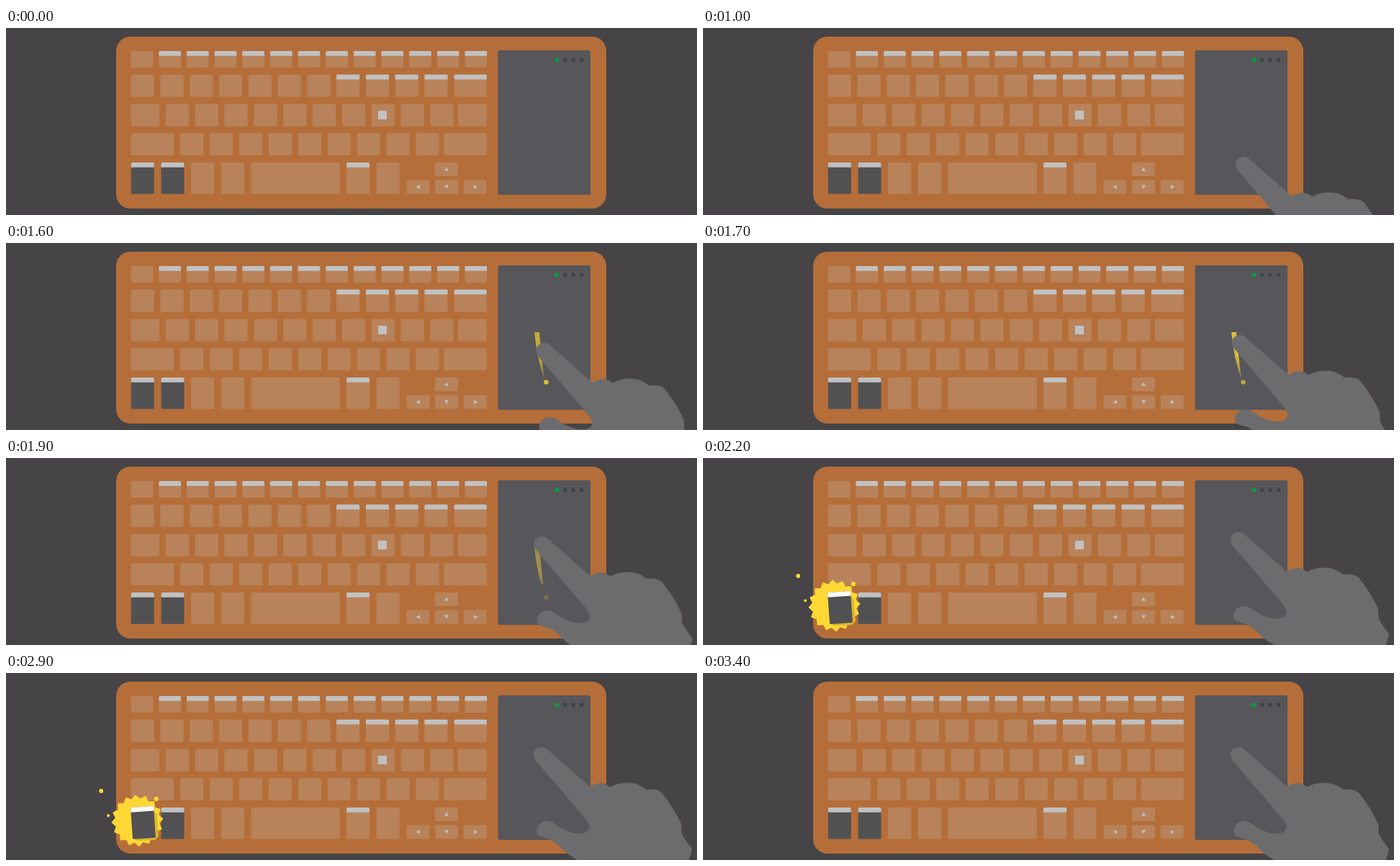
Write an HTML page that moves like this. It is 960 by 260 pixels and loops after 3.6 s.

```html
<!DOCTYPE html>
<html lang="en">
<head>
<meta charset="utf-8">
<title>Keyboard with touchpad</title>
<style>
  html, body { margin: 0; width: 100%; height: 100%; overflow: hidden; background: #464446; }
  svg { display: block; width: 960px; height: 260px; }
  .key { fill: #b8835b; }
  .dark { fill: #515153; }
  .cap { fill: #c1c1c2; }
  .yellow { fill: #fdd835; }
  .shade { fill: #dcb92e; }
  .anim { animation: 3600ms step-end infinite; }

  #hand { fill: #6c6c6e; animation-name: swipe; }
  @keyframes swipe {
    0% { visibility: hidden; transform: translate(7px, 76px); }
    27.777% { visibility: visible; transform: translate(7px, 76px); }
    41.666% { visibility: visible; transform: translate(5.5px, 48px); }
    44.444% { visibility: visible; transform: translate(3.7px, 36px); }
    47.222% { visibility: visible; transform: translate(2px, 25px); }
    50% { visibility: visible; transform: translate(1.2px, 14px); }
    52.777% { visibility: visible; transform: translate(.5px, 6px); }
    55.555%, 100% { visibility: visible; transform: none; }
  }

  #spot { animation-name: spot; }
  @keyframes spot {
    0% { opacity: 0; }
    41.666% { opacity: 1; }
    44.444% { opacity: .8; }
    47.222% { opacity: .6; }
    50% { opacity: .4; }
    52.777% { opacity: .2; }
    55.555%, 100% { opacity: 0; }
  }

  #trail { animation-name: trail; }
  @keyframes trail {
    0% { opacity: 0; clip-path: inset(0 0 5% 0); }
    41.666% { opacity: .5; clip-path: inset(0 0 5% 0); }
    44.444% { opacity: .65; clip-path: inset(0 0 0 0); }
    47.222% { opacity: .8; clip-path: inset(0 0 0 0); }
    50% { opacity: .65; clip-path: inset(0 0 12% 0); }
    52.777% { opacity: .45; clip-path: inset(0 0 24% 0); }
    55.555% { opacity: .25; clip-path: inset(0 0 36% 0); }
    58.333%, 100% { opacity: 0; clip-path: inset(0 0 36% 0); }
  }

  #rest { animation-name: rest; }
  @keyframes rest {
    0% { visibility: visible; }
    58.333% { visibility: hidden; }
    94.444%, 100% { visibility: visible; }
  }
  #start { animation-name: start; }
  @keyframes start {
    0% { visibility: hidden; }
    58.333% { visibility: visible; }
    61.111%, 100% { visibility: hidden; }
  }
  #left { animation-name: left; }
  @keyframes left {
    0% { visibility: hidden; }
    61.111% { visibility: visible; }
    75% { visibility: hidden; }
    80.555% { visibility: visible; }
    94.444%, 100% { visibility: hidden; }
  }
  #right { animation-name: right; }
  @keyframes right {
    0% { visibility: hidden; }
    75% { visibility: visible; }
    80.555%, 100% { visibility: hidden; }
  }
</style>
</head>
<body>
<svg viewBox="0 0 960 260">
  <defs>
    <linearGradient id="glow" x1="0" y1="0" x2="0" y2="1">
      <stop offset="0" stop-color="#fdd835"/>
      <stop offset=".5" stop-color="#fdd835"/>
      <stop offset="1" stop-color="#fdd835" stop-opacity=".35"/>
    </linearGradient>
  </defs>

  <rect x="153" y="12" width="681" height="239" rx="20" fill="#b56e39"/>
  <g id="keys"></g>
  <g id="rest" class="anim"></g>
  <rect x="517" y="115" width="12" height="12" class="cap"/>
  <path class="cap" d="M612 193.5l3 5h-6zM609 218.5h6l-3 5zM569.5 221l5.5-2.8v5.6zM655.5 221l-5.5-2.8v5.6z"/>

  <rect x="683.5" y="31" width="128.5" height="201" rx="2.5" fill="#57565a"/>
  <circle cx="765.3" cy="44.4" r="3" fill="#089c44"/>
  <g fill="#434246">
    <circle cx="776.7" cy="44.4" r="2.9"/>
    <circle cx="788.1" cy="44.4" r="2.9"/>
    <circle cx="799.6" cy="44.4" r="2.9"/>
  </g>

  <path id="trail" class="anim" fill="url(#glow)" d="M734 124Q738 162 748 190Q744 158 741 124Z"/>
  <circle id="spot" class="anim yellow" cx="750.5" cy="193.5" r="3.3"/>

  <g id="start" class="anim"></g>
  <g id="left" class="anim"></g>
  <g id="right" class="anim"></g>

  <path id="hand" class="anim" d="M736 122C731 116 732 107 739 104C744 102 749 103 753 107L811 158
    C820 152 832 151 839 158.500C854 150 876 150 889 162C898 161.500 907 162 911 166.500
    C922 180 932 196 938 210C939 215 938 220 939 224C943 232 949 238 953 245
    C952 252 949 257 948 262V350H850L797 262C787 256 780 252 774 246C768 239 761 234 752 230
    C743 228 736 226 737 219C738 211 745 205 752 206C763 207 768 216 778 219
    C788 224 802 225 808 220C812 216 811 210 806 204Z"/>
</svg>
<script>
  const $ = id => document.getElementById(id);

  function add(parent, tag, attrs) {
    const el = document.createElementNS('http://www.w3.org/2000/svg', tag);
    for (const name in attrs) el.setAttribute(name, attrs[name]);
    parent.append(el);
    return el;
  }

  function key(x, y, width, height, { cap = false, dark = false, parent = $('keys') } = {}) {
    add(parent, 'rect', { x, y, width, height, rx: 1.5, class: dark ? 'dark' : 'key' });
    if (cap) add(parent, 'path', {
      class: 'cap',
      d: `M${x} ${y + 6.7}v-5.2q0-1.500 1.500-1.500h${width - 3}q1.500 0 1.500 1.500v5.200z`
    });
  }

  function row(count, x, y, step, width, height, capFrom = count) {
    for (let i = 0; i < count; i++) key(x + i * step, y, width, height, { cap: i >= capFrom });
  }

  row(13, 173.8, 32, 38.65, 30.5, 23, 1);
  row(11, 173.8, 64.7, 40.77, 32, 31, 7);
  key(622.8, 64.7, 45, 31, { cap: true });
  key(173.8, 105.8, 39.2, 31);
  row(10, 222, 105.8, 40.83, 32, 31);
  key(628, 105.8, 39.8, 31);
  key(173.8, 146.2, 59.2, 30.8);
  row(9, 242.2, 146.2, 40.93, 32, 30.8);
  key(608.4, 146.2, 59.4, 30.8);

  const bottom = 187, tall = 43.7;
  key(173.8, bottom, 32, tall, { cap: true, dark: true, parent: $('rest') });
  key(215.5, bottom, 32, tall, { cap: true, dark: true });
  row(2, 257.2, bottom, 41.7, 32, tall);
  key(340.6, bottom, 123.2, tall);
  key(473, bottom, 32, tall, { cap: true });
  key(514.6, bottom, 32, tall);
  key(596, bottom, 32, 19);
  row(3, 556.6, 211.6, 39.6, 31.8, 19);

  // A spiky flash with the popped key on top of it.
  function flash(id, { turn, tilt, size, dots }) {
    const parent = $(id), points = [];
    for (let i = 0; i < 32; i++) {
      const a = (turn + i * 11.25) * Math.PI / 180;
      const r = (i % 2 ? 30 : 35.2) * size;
      points.push([182.5 + r * Math.cos(a), 205.3 + r * Math.sin(a)].map(n => n.toFixed(1)));
    }
    add(parent, 'polygon', {
      points: points.join(' '), class: 'yellow',
      stroke: '#fdd835', 'stroke-width': 1.5, 'stroke-linejoin': 'round'
    });
    const top = add(parent, 'g', { transform: `translate(190.5 208) rotate(${tilt})` });
    add(top, 'path', { class: 'shade', d: 'M16-16L20-10V20L15 25H-9L-14 21.500Z' });
    add(top, 'rect', { x: -16, y: -22, width: 32, height: 44, rx: 1.5, class: 'dark' });
    add(top, 'path', { fill: '#fff', d: 'M-16-15.500v-5q0-1.500 1.500-1.500h29q1.500 0 1.500 1.500v5z' });
    for (const [cx, cy, r] of dots) add(parent, 'circle', { cx, cy, r, class: 'yellow' });
  }

  flash('start', { turn: -93, tilt: -2, size: .88, dots: [] });
  flash('left', { turn: -94, tilt: -4, size: 1, dots: [[132.2, 164, 2.9], [142.2, 198.2, 2], [208.8, 175.2, 3.1]] });
  flash('right', { turn: -88, tilt: 4, size: 1.02, dots: [[137, 161, 2.9], [140, 203, 2], [211, 171, 3.1]] });
</script>
</body>
</html>
```
